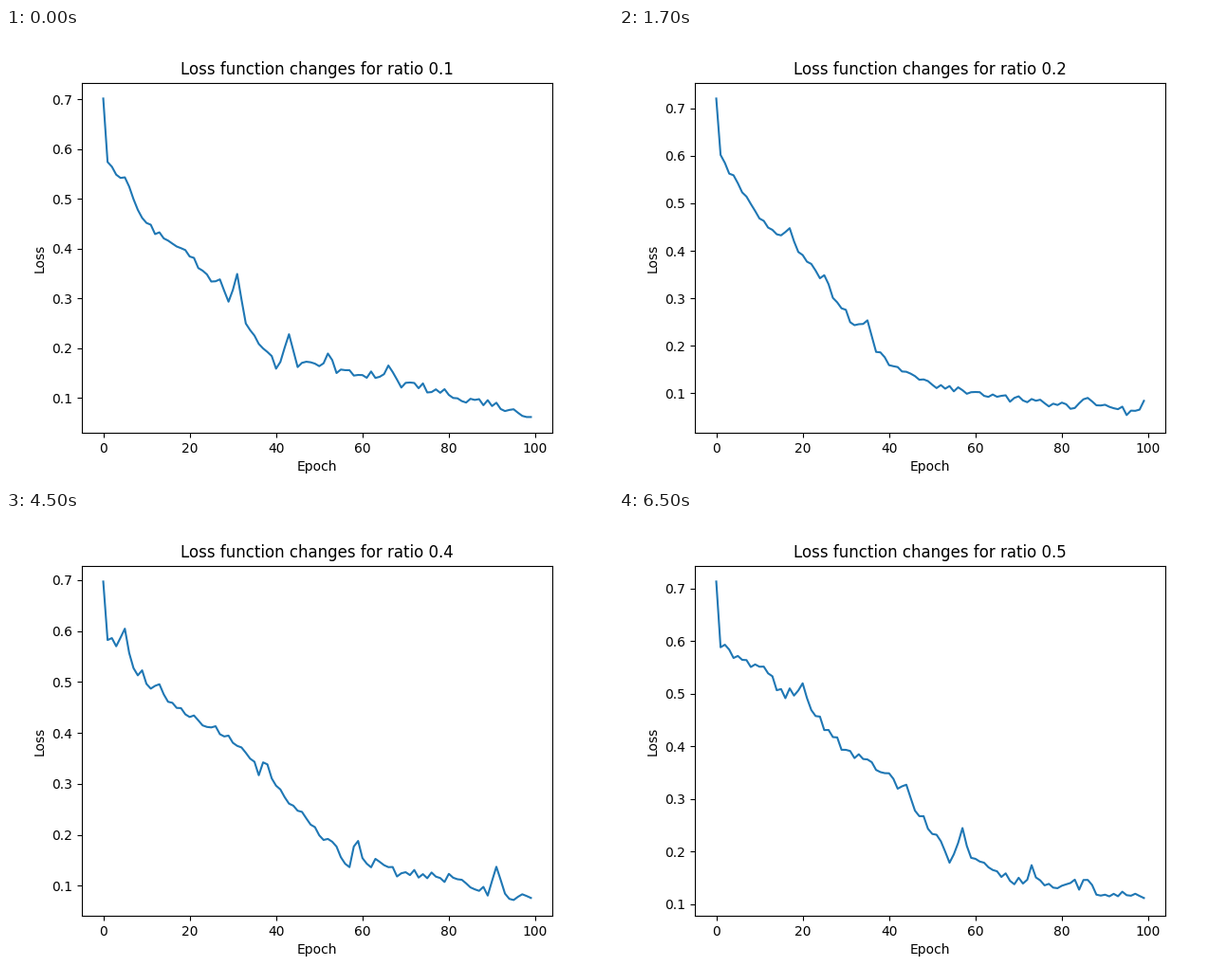
A matplotlib script that plays this animation: 640 px wide and 480 px high, repeating every 8000 ms.

```python
import numpy as np
import matplotlib.pyplot as plt
from matplotlib.animation import FuncAnimation

INTERVAL = 500
FRAMES = 16
EPOCHS = np.arange(100)
TREND_EPOCHS = [0, 1, *range(10, 100, 10), 99]
JITTER = 0.005
MARGIN = 0.05

# Per ratio: lowest loss, trend at TREND_EPOCHS, and bumps {epoch: height}.
RUNS = [
    (.0615,
     [.702, .575, .455, .385, .282, .165, .162, .148, .130, .105, .085, .0615],
     {5: .02, 27: .03, 31: .08, 43: .06, 52: .03, 66: .02}),
    (.0495,
     [.721, .598, .468, .391, .265, .165, .116, .102, .087, .076, .071, .060],
     {17: .035, 25: .03, 35: .035, 86: .02, 99: .022}),
    (.061,
     [.653, .600, .480, .382, .282, .165, .150, .122, .108, .087, .085, .072],
     {11: .03, 38: .035, 46: .06, 49: .02, 93: .035}),
    (.072,
     [.697, .595, .495, .431, .385, .295, .200, .145, .125, .115, .085, .075],
     {5: .055, 13: .023, 38: .03, 56: -.025, 59: .035, 64: .02, 91: .055}),
    (.108,
     [.713, .589, .550, .485, .395, .345, .235, .182, .140, .140, .122, .112],
     {15: -.02, 20: .038, 44: .03, 54: -.035, 57: .04, 73: .025, 86: .02}),
]


def loss_curve(lowest, trend, bumps, seed):
    """Falling trend with short triangular bumps and seeded jitter."""
    loss = np.interp(EPOCHS, TREND_EPOCHS, trend)
    for epoch, height in bumps.items():
        loss += height * np.maximum(0, 1 - np.abs(EPOCHS - epoch) / 2)
    jitter = np.random.default_rng(seed).normal(0, JITTER, len(EPOCHS))
    jitter[0] = 0
    return np.clip(loss + jitter, lowest, trend[0])


CURVES = [loss_curve(*run, seed) for seed, run in enumerate(RUNS)]

fig, ax = plt.subplots(figsize=(6.4, 4.8), dpi=100)


def draw(frame):
    # Each curve holds for 2 s; the loop opens 1.5 s into the first one.
    index = (frame + 3) // 4
    lowest, trend, _ = RUNS[index]
    pad = MARGIN * (trend[0] - lowest)
    ax.clear()
    ax.plot(EPOCHS, CURVES[index])
    ax.set_ylim(lowest - pad, trend[0] + pad)
    ax.set_title(f"Loss function changes for ratio 0.{index + 1}")
    ax.set_xlabel("Epoch")
    ax.set_ylabel("Loss")


anim = FuncAnimation(fig, draw, frames=FRAMES, interval=INTERVAL,
                     init_func=lambda: draw(0), repeat=True, repeat_delay=0)
plt.show()
```
